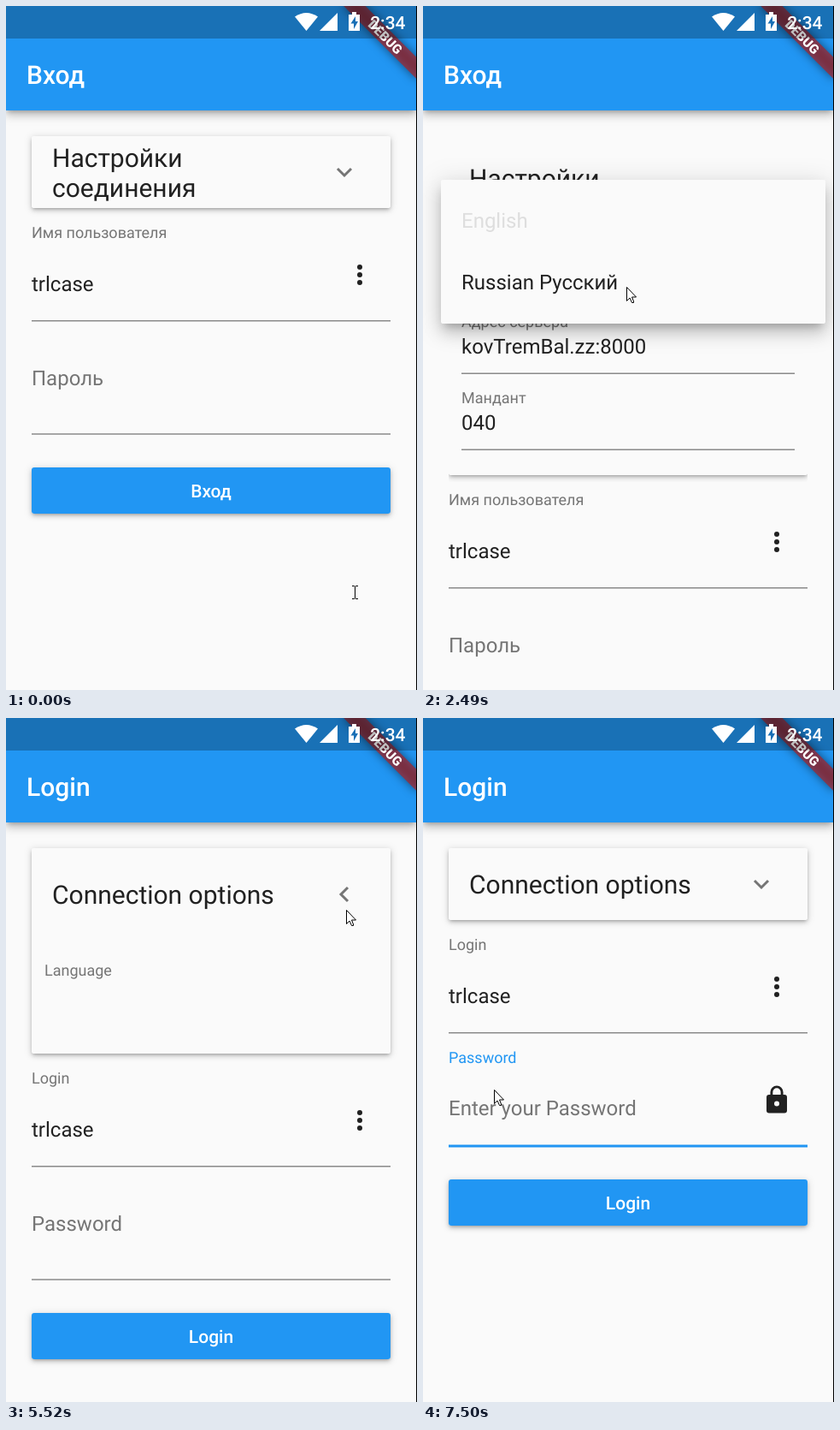
Animation, 481 px wide and 799 px high, one loop 8 s. Source, as an HTML page with a canvas:

```html
<!DOCTYPE html>
<html lang="en">
<head>
<meta charset="utf-8">
<title>Login form</title>
<style>
  html, body { margin: 0; width: 100%; height: 100%; overflow: hidden; background: #fafafa; }
  canvas { display: block; }
</style>
</head>
<body>
<canvas id="stage" width="481" height="799"></canvas>
<script>
const ctx = document.getElementById('stage').getContext('2d');
ctx.textRendering = 'geometricPrecision';
const LOOP = 8000, STEP = 150, DP = 1.5;
const BLUE = '#2196f3', PAPER = '#fafafa', INK = '#212121', GREY = '#757575', LINE = '#8a8a8a';

const RU = {
  title: 'Вход', header: ['Настройки', 'соединения'], language: 'Язык', value: 'Russian Русский',
  host: 'Адрес сервера', client: 'Мандант', user: 'Имя пользователя', password: 'Пароль'
};
const EN = {
  title: 'Login', header: ['Connection options'], language: 'Language', value: 'English',
  host: 'Host', client: 'Client', user: 'Login', password: 'Password'
};

// The pointer follows one curve per move: first step, step count, control point, end point
const MOVES = [
  { start: 120, steps: 6, via: [375, 180], to: [397, 203] },
  { start: 1420, steps: 4, via: [320, 280], to: [238, 328] },
  { start: 2640, steps: 6, via: [170, 260], to: [127, 250] },
  { start: 4310, steps: 3, via: [256, 673], to: [365, 428] },
  { start: 4760, steps: 4, via: [430, 330], to: [398, 224] },
  { start: 5820, steps: 4, via: [280, 310], to: [83, 434] }
];

const lerp = (a, b, p) => a + (b - a) * p;

// Stepped progress from 0 to 1; a power above 1 eases out
function progress(t, start, steps, power = 1) {
  const done = Math.floor((t - start) / STEP) + 1;
  const p = Math.min(1, Math.max(0, done / steps));
  return 1 - (1 - p) ** power;
}

function saved(draw) {
  ctx.save();
  draw();
  ctx.restore();
}

function text(str, x, y, size = 24, color = INK, weight = 400, align = 'left') {
  ctx.font = `${weight} ${size}px Roboto, sans-serif`;
  ctx.textAlign = align;
  ctx.fillStyle = color;
  ctx.fillText(str, x, y);
}

function fill(path, color) {
  ctx.fillStyle = color;
  ctx.fill(typeof path === 'string' ? new Path2D(path) : path);
}

function stroke(path, color, width) {
  ctx.strokeStyle = color;
  ctx.lineWidth = width;
  ctx.stroke(new Path2D(path));
}

function rect(x, y, w, h, color) {
  ctx.fillStyle = color;
  ctx.fillRect(x, y, w, h);
}

function clipRect(x, y, w, h) {
  ctx.beginPath();
  ctx.rect(x, y, w, h);
  ctx.clip();
}

function rounded(x, y, w, h, r) {
  const path = new Path2D();
  path.roundRect(x, y, w, h, r);
  return path;
}

const dot = (x, y, r, color) => fill(rounded(x - r, y - r, 2 * r, 2 * r, r), color);

// Raised surface: umbra, penumbra and ambient shadow grow with the elevation
function box(x, y, w, h, r, color, elevation) {
  const shape = rounded(x, y, w, h, r);
  const e = elevation * DP;
  const shadow = (dy, blur, spread, alpha) => {
    ctx.filter = `blur(${blur * .577 + .75}px)`;
    fill(rounded(x - spread, y + dy - spread, w + 2 * spread, h + 2 * spread, r), `rgba(0,0,0,${alpha})`);
  };
  saved(() => {
    const outside = new Path2D(shape);
    outside.rect(0, 0, 481, 799);
    ctx.clip(outside, 'evenodd');
    shadow(e * .6, e * .6, -e * .35, .2);
    shadow(e, e * 1.2, 0, .14);
    shadow(e * .35, e * 2, e * .2, .12);
  });
  fill(shape, color);
}

function field(label, value, y) {
  text(label, 45, y, 18, GREY);
  text(value, 45, y + 31);
  rect(45, y + 53.5, 390, 1.5, LINE);
}

function drawCard(s, open, t) {
  const bottom = 236 + 312 * open, shift = Math.round(24 * open);
  saved(() => {
    if (open > .9) clipRect(30, bottom - 4, 420, 12);
    box(30, 152, 420, bottom - 152, 3, PAPER, 2);
  });
  const first = s.header.length > 1 ? 188 : 205;
  s.header.forEach((line, i) => text(line, 54, first + 35 * i + shift, 30));
  saved(() => {
    ctx.translate(396, 194 + shift);
    ctx.rotate(Math.PI * Math.round(open * 10) / 10);
    stroke('M-8-4L0 4 8-4', GREY, 3);
  });
  if (!open) return;
  saved(() => {
    clipRect(30, 152, 420, (open < 1 ? lerp(236, 390, open) : bottom) - 152);
    text(s.language, 45, 301, 18, GREY);
    text(s.value, 45, 331);
    fill('M409.5 320h15l-7.5 7.5z', '#666');
    rect(45, 340, 390, 1.5, '#d2d2d2');
    field(s.host, 'kovTremBal.zz:8000', 375);
    field(s.client, '040', 464);
  });
}

function drawLock() {
  fill(rounded(402, 440, 24, 21.5, 3), INK);
  stroke('M407.9 441V437a6.1 6.1 0 0 1 12.2 0V441', INK, 2.9);
  dot(414, 450.5, 3, PAPER);
}

function drawForm(s, focus) {
  text(s.user, 30, 271, 18, GREY);
  text('trlcase', 30, 333);
  for (let i = -1; i <= 1; i++) dot(414, 314 + 9 * i, 3, INK);
  rect(30, 367, 420, 1.5, LINE);

  const accent = focus ? BLUE : GREY, line = lerp(1.5, 3, focus);
  text(s.password, 30, lerp(443, 403, focus), lerp(24, 18, focus), accent);
  rect(30, 500 - line / 2, 420, line, focus ? BLUE : LINE);
  if (focus) {
    drawLock();
    saved(() => {
      ctx.globalAlpha = focus;
      text('Enter your Password', 30, 464, 24, GREY);
    });
  }

  box(30, 539, 420, 54, 3, BLUE, 2);
  text(s.title, 240, 574, 21, '#fff', 500, 'center');
}

function drawMenu(alpha, itemAlpha) {
  saved(() => {
    ctx.globalAlpha = alpha;
    box(21, 203, 450, 168, 3, PAPER, 8);
    text(RU.value, 45, 331);
    ctx.globalAlpha = alpha * itemAlpha;
    text(EN.value, 45, 259);
    if (alpha < 1) {
      ctx.globalAlpha = 1 - alpha;
      text(EN.value, 45, 331);
    }
  });
}

function drawAppBar(title) {
  box(0, 0, 480, 122, 0, BLUE, 4);
  text(title, 24, 91, 30, '#fff', 500);
}

function drawRibbon() {
  saved(() => {
    ctx.translate(480, 0);
    ctx.rotate(Math.PI / 4);
    ctx.filter = 'blur(6px)';
    rect(-60, 42, 120, 18, 'rgba(0,0,0,.5)');
    ctx.filter = 'none';
    rect(-60, 42, 120, 18, 'rgba(183,28,28,.627)');
    text('DEBUG', 0, 56.5, 15.3, '#fff', 900, 'center');
  });
}

// The system bar shades whatever the app paints beneath it
function drawStatus() {
  rect(0, 0, 480, 38, 'rgba(0,0,0,.25)');
  fill('M351.5 29L338 12.5Q351.5 3.5 365 12.5Z', '#fff');
  fill('M367 29H388V8Z', '#fff');
  fill('M401 10H405V7H410V10H414V29H401Z', '#fff');
  fill('M409 12L403.5 20.5H407V27L412 18H409Z', '#1970b6');
  text('2:34', 467.5, 27, 21, '#fff', 500, 'right');
}

function drawPointer(t) {
  let spot = [408, 685], moved = false;
  for (const { start, steps, via, to } of MOVES) {
    const p = progress(t, start, steps);
    if (!p) break;
    moved = true;
    spot = spot.map((from, i) => Math.round(lerp(lerp(from, via[i], p), lerp(via[i], to[i], p), p)));
  }
  saved(() => {
    ctx.translate(...spot);
    if (moved) {
      const arrow = 'M.5.5V16.5L4 13 6.5 18.5H8.5V17L6.5 12H11.5Z';
      fill(arrow, '#fff');
      stroke(arrow, '#000', 1);
    } else {
      stroke('M.5-7V7M-3-7.5H0M1-7.5H4M-3 7.5H0M1 7.5H4', '#000', 1);
    }
  });
}

function draw(t) {
  const s = t < 3850 ? RU : EN;
  const open = progress(t, 1270, 2, 8) - progress(t, 5520, 2);
  const menu = t < 2490 ? 0 : 1 - progress(t, 3850, 2, 1.6);
  const focus = progress(t, 7050, 4, 2);

  rect(0, 0, 481, 799, PAPER);
  drawCard(s, open, t);
  saved(() => {
    ctx.translate(0, Math.round(312 * open));
    drawForm(s, focus);
  });
  drawAppBar(s.title);
  if (menu) drawMenu(menu, progress(t, 2490, 2) ** 3);
  drawRibbon();
  drawStatus();
  rect(480, 0, 1, 799, '#000');
  drawPointer(t);
}

const begin = performance.now();
function tick() {
  draw((performance.now() - begin) % LOOP);
  requestAnimationFrame(tick);
}
tick();
</script>
</body>
</html>
```
